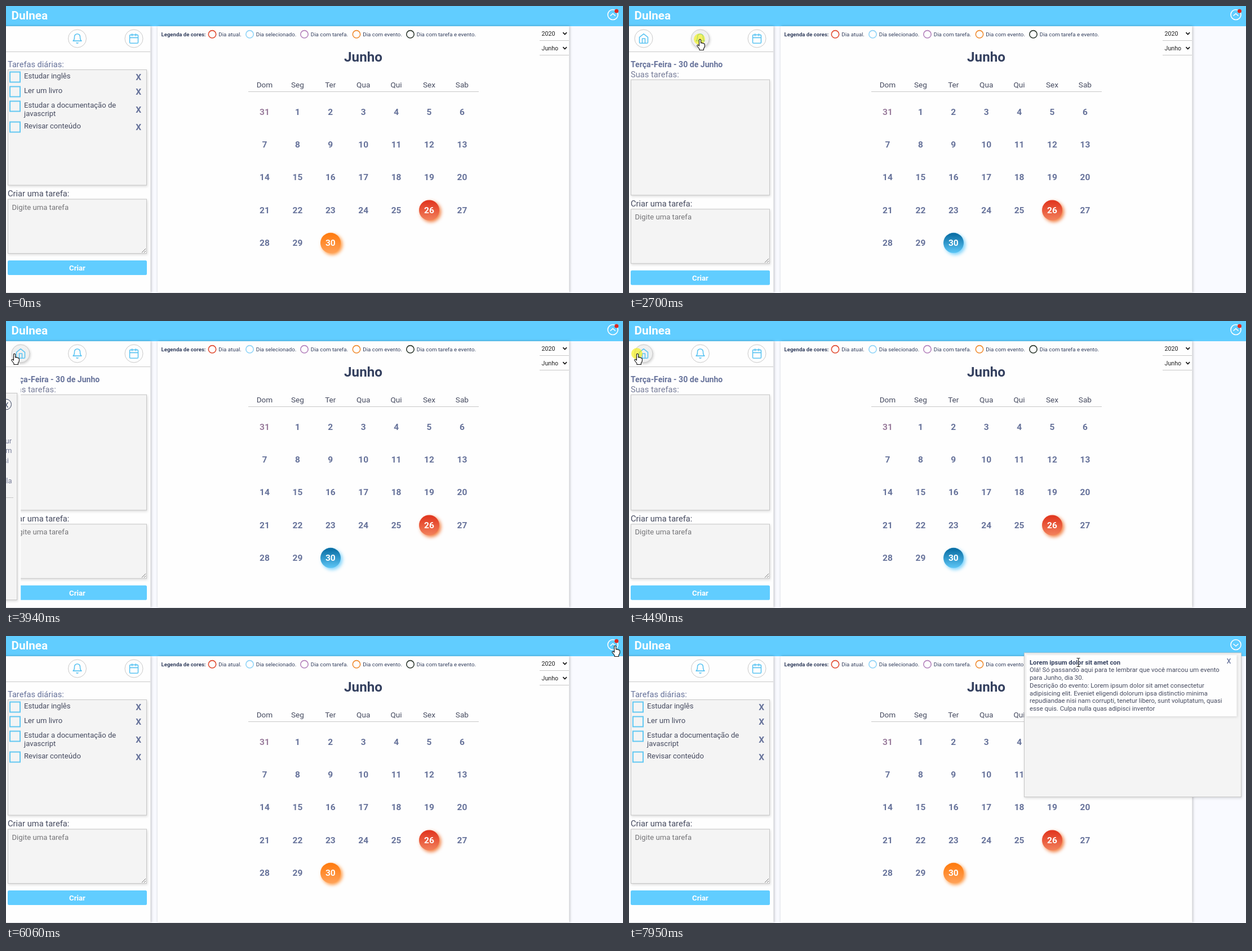
Animation, 1095 px wide and 511 px high, one loop 8 s. Source, as an HTML page:

```html
<!DOCTYPE html>
<html lang="pt">
<head>
<meta charset="utf-8">
<title>Calendário</title>
<style>
html, body { margin: 0; width: 100%; height: 100%; overflow: hidden; background: #f9faff; }
svg { display: block; font-family: Roboto, sans-serif; }
.icon { fill: none; stroke: #5bc4f2; stroke-width: 1.9; stroke-linejoin: round; stroke-linecap: round; }
.ring { fill: #fefefe; stroke: #c9c9c9; stroke-width: 1; }
.hover .ring { fill: #f0f0f0; filter: drop-shadow(1px 2px 2px #0003); }
.field { fill: #f4f4f4; stroke: #c6c6c6; filter: drop-shadow(1px 2px 2px #0002); }
.sheet { fill: #fefefe; filter: drop-shadow(1px 0 2px #0004); }
.card { fill: #fefefe; filter: drop-shadow(1px 1px 2px #0002); }
.rule { stroke: #c8c8c8; }
</style>
</head>
<body>
<svg id="stage" width="1095" height="511" viewBox="0 0 1095 511"></svg>
<script>
const DARK = '#34405f', MID = '#66729a', BODY = '#464b60', SOFT = '#767c98', SKY = '#61cdff';
const SPAN = 8000, TICK = 77.7;

const text = (x, y, s, size, fill, weight = 400, anchor = 'start') =>
  `<text x="${x}" y="${y}" font-size="${size}" fill="${fill}" font-weight="${weight}" text-anchor="${anchor}">${s}</text>`;
const box = (x, y, w, h, cls) => `<rect x="${x}" y="${y}" width="${w}" height="${h}" class="${cls}"/>`;
const rule = (x1, x2, y) => `<path class="rule" d="M${x1} ${y}H${x2}"/>`;
const lines = (x, y, step, list, size, fill) => list.map((s, i) => text(x, y + i * step, s, size, fill)).join('');
const gradient = (id, a, b) =>
  `<linearGradient id="${id}" x2="0" y2="1"><stop offset=".1" stop-color="${a}"/><stop offset="1" stop-color="${b}"/></linearGradient>`;
const ball = (id, x, y, fill, glow) =>
  `<circle id="${id}" cx="${x}" cy="${y}" r="18" fill="url(#${fill})" style="filter:drop-shadow(3px 3px 3px ${glow})"/>`;
// Icon paths are drawn on a 24-unit grid
const roundIcon = (id, x, d) =>
  `<g id="${id}" transform="translate(${x} 58)"><circle class="ring" r="16"/>
   <path class="icon" transform="scale(.83) translate(-12 -12)" d="${d}"/></g>`;

function header() {
  return `<rect width="1095" height="36" fill="${SKY}"/>` + text(9.5, 24, 'Dulnea', 20.8, '#fff', 700) +
    `<g fill="none" stroke="#fff" stroke-width="1.6"><circle cx="1077" cy="15.5" r="9"/>
     <path id="up" d="M1072.5 17.5l4.5-4 4.5 4"/><path id="down" d="M1072.5 14l4.5 4 4.5-4"/></g>
     <circle id="dot" cx="1083.5" cy="9" r="3.5" fill="#e0281f"/>`;
}

function calendar() {
  let out = box(269, 36, 730.5, 474, 'sheet') + text(275.5, 53.5, 'Legenda de cores:', 9.6, DARK, 700);
  [[366, '#e04a30', 'Dia atual.'], [432.5, '#8fd4f8', 'Dia selecionado.'], [529.5, '#b583bd', 'Dia com tarefa.'],
   [622, '#f08c30', 'Dia com evento.'], [717.5, '#2f3a30', 'Dia com tarefa e evento.']].forEach(([x, color, label]) => {
    out += `<circle cx="${x}" cy="50.3" r="6.7" fill="none" stroke="${color}" stroke-width="1.6"/>` + text(x + 11.3, 53.5, label, 9.75, DARK);
  });
  [['2020', 49], ['Junho', 75]].forEach(([s, y]) => {
    out += text(950.5, y + 3.8, s, 10.7, '#222') + rule(947, 999, y + 12.5) +
      `<path d="M988.5 ${y - 1.8}l3.3 3.3 3.3-3.3" fill="none" stroke="#111" stroke-width="1.7"/>`;
  });
  out += text(634, 98.5, 'Junho', 24.2, DARK, 700, 'middle') + rule(430, 839, 152.5);
  const colX = i => 459 + 58.4 * i;
  'Dom Seg Ter Qua Qui Sex Sab'.split(' ').forEach((s, i) => out += text(colX(i), 145.3, s, 13.6, BODY, 400, 'middle'));
  out += ball('today', 751, 363.5, 'red', '#f27a3c') + ball('event', 576, 421.8, 'orange', '#ff9236') +
    ball('picked', 576, 421.8, 'blue', '#5cc8fad0');
  for (let i = 0; i < 31; i++) {
    const fill = i === 0 ? '#9a7d9d' : i === 26 || i === 30 ? '#fff' : MID;
    out += text(colX(i % 7), 193.5 + 58.4 * Math.floor(i / 7), i || 31, 15.5, fill, 700, 'middle');
  }
  return out;
}

// Task list, text area and button, shared by both sidebar views
function taskForm(y) {
  return box(3.5, y + .5, 246, 205.5, 'field') + text(3, y + 226, 'Criar uma tarefa:', 14.7, BODY) +
    box(3.5, y + 231, 246, 96.5, 'field') + text(10.5, y + 249.5, 'Digite uma tarefa', 13.15, '#757578') +
    `<path d="M241 ${y + 326}l7-7m-3 7l3-3" stroke="#777"/>
     <rect x="3" y="${y + 340}" width="247" height="26" rx="2.5" fill="${SKY}"/>` +
    text(126.5, y + 357.8, 'Criar', 13.2, '#fff', 700, 'middle');
}

function sidebar() {
  let tasks = '';
  [[126.5, ['Estudar inglês']], [152.5, ['Ler um livro']],
   [178.5, ['Estudar a documentação de', 'javascript'], 184], [215.5, ['Revisar conteúdo']]].forEach(([y, rows, xy = y]) => {
    tasks += `<rect x="7" y="${y - 9}" width="18" height="18" fill="none" stroke="#62c8f2" stroke-width="2"/>` +
      lines(32, y + 2.7, 15.2, rows, 13.1, BODY) + text(235.3, xy + 5.5, 'X', 15.5, MID, 700, 'middle');
  });
  const lorem = ['Lorem ipsum dolor sit amet consectetur', 'adipisicing elit. Eveniet eligendi dolorum',
    'ipsa distinctio minima repudiandae nisi', 'nam corrupti, tenetur libero, sunt',
    'voluptatum, quasi esse quis. Culpa nulla', 'quas adipisci inventor'];
  return box(-5, 36, 261.5, 474, 'sheet') +
    `<g id="home">${text(3, 108.8, 'Tarefas diárias:', 14.6, MID) + taskForm(113) + tasks}</g>
     <g id="day">${text(3, 109, 'Terça-Feira - 30 de Junho', 14.1, MID, 700) + text(3, 126.5, 'Suas tarefas:', 14.7, SOFT) + taskForm(130.8)}</g>
     <g id="events"><rect y="82" width="256" height="427" fill="#fefefe"/>` +
    text(126.5, 104, 'Eventos', 16.8, DARK, 700, 'middle') + text(126.5, 124, 'Dia 30 de Junho', 16.8, DARK, 700, 'middle') +
    box(3.5, 128.5, 246, 368, 'field') + text(8, 152.5, 'Terça-Feira', 14.4, MID, 500) +
    `<circle cx="230" cy="148.5" r="9.3" fill="none" stroke="${DARK}"/>` + text(230, 153.5, 'X', 13.5, DARK, 400, 'middle') +
    text(8, 168, 'Nome:', 12, MID, 700) + text(8, 185, 'Lorem ipsum dolor sit amet con', 13.05, SOFT) +
    text(8, 200.5, 'Descrição:', 12, MID, 700) + lines(8, 217.5, 17.8, lorem, 13.05, SOFT) + rule(8, 243, 314.5) + '</g>' +
    rule(0, 256, 81.5) +
    roundIcon('house', 26, 'M3 9l9-7 9 7v11a2 2 0 0 1-2 2H5a2 2 0 0 1-2-2zM9 22V12h6v10') +
    roundIcon('back', 26, 'M19 12H5M12 19l-7-7 7-7') +
    roundIcon('bell', 126.5, 'M18 8A6 6 0 0 0 6 8c0 7-3 9-3 9h18s-3-2-3-9M13.7 21a2 2 0 0 1-3.4 0') +
    roundIcon('agenda', 227, 'M5 4H19a2 2 0 0 1 2 2V20a2 2 0 0 1-2 2H5a2 2 0 0 1-2-2V6a2 2 0 0 1 2-2zM16 2v4M8 2v4M3 10h18');
}

function notice() {
  const rows = ['Olá! Só passando aqui para te lembrar que você marcou um evento', 'para Junho, dia 30.',
    'Descrição do evento: Lorem ipsum dolor sit amet consectetur', 'adipisicing elit. Eveniet eligendi dolorum ipsa distinctio minima',
    'repudiandae nisi nam corrupti, tenetur libero, sunt voluptatum, quasi', 'esse quis. Culpa nulla quas adipisci inventor'];
  return `<g id="notice">${box(701.5, 30, 385, 256.5, 'field') + box(705, 34, 373.5, 109, 'card')}` +
    text(711, 50.7, 'Lorem ipsum dolor sit amet con', 11.3, DARK, 700) +
    lines(711, 64.3, 13.75, rows, 11.35, BODY) + text(1064.5, 49, 'X', 12, MID, 500, 'middle') + '</g>';
}

function overlay() {
  return `<g id="tip"><rect x="592.5" y="443.5" width="155" height="19" fill="#2b2b2b" stroke="#6a6a6a"/>
    <text x="598" y="456.5" font-size="9.2" fill="#fff" font-family="Open Sans, Noto Sans, sans-serif">há tarefas e eventos para este dia</text></g>
    <circle id="click" r="10" fill="#f5f000" opacity=".6"/>
    <g id="cursor" fill="#fff" stroke="#111" stroke-width="1.1" stroke-linejoin="round">
    <path id="arrow" d="M.5.5V16L4 12.6 6.4 18 8.8 17 6.5 11.6H11.5Z"/>
    <path id="hand" d="M-1.5 1.2Q0-.8 1.5 1.2V7Q3 5.6 4.3 7.4 5.8 6.4 6.7 8.2 8.3 7.6 8.4 9.5V13.5L6.4 17V19.5H-1V17.5L-5.2 12Q-5.2 9.4-3 10.6L-1.5 12Z"/>
    <path id="ibeam" fill="none" stroke="#222" d="M-3-7.5H-1Q0-7.5 0-6.5 0-7.5 1-7.5H3M0-6.5V6.5M-3 7.5H-1Q0 7.5 0 6.5 0 7.5 1 7.5H3"/></g>`;
}

document.getElementById('stage').innerHTML =
  gradient('red', '#e23a22', '#f2815c') + gradient('orange', '#ff7d12', '#ffa158') + gradient('blue', '#0d72a8', '#5cc6f6') +
  header() + calendar() + sidebar() + notice() + overlay();

const el = {};
document.querySelectorAll('#stage [id]').forEach(e => el[e.id] = e);
const show = (id, on) => el[id].style.display = on ? '' : 'none';
const move = (id, x, y) => el[id].setAttribute('transform', `translate(${x.toFixed(2)} ${y.toFixed(2)})`);
const part = (t, from, length) => Math.min(1, Math.max(0, (t - from) / length));
const glide = p => 1 - (1 - p) ** 2.2;
const smooth = p => p * p * (3 - 2 * p);

const path = [[140, 1032, 357], [910, 584, 431], [1990, 584, 431], [2460, 126, 59], [2980, 126, 59], [3170, 113.7, 59],
  [3470, 15, 58], [4640, 15, 58], [5180, 951, 20], [5300, 951, 20], [5650, 1081, 17], [6280, 1081, 17], [6760, 848, 3],
  [6800, 848, 3], [7160, 744, 60], [7260, 744, 60], [7460, 715.5, 50], [7570, 715.5, 50], [7900, 797.5, 47]];
const clicks = [1765, 2695, 3550, 4405, 6110];

function pointer(t) {
  const i = path.findIndex(k => k[0] > t);
  if (i < 0) return path[path.length - 1].slice(1);
  if (i === 0) return path[0].slice(1);
  const [t0, x0, y0] = path[i - 1], [t1, x1, y1] = path[i];
  const p = smooth((t - t0) / (t1 - t0));
  return [x0 + (x1 - x0) * p, y0 + (y1 - y0) * p];
}

function draw(time) {
  const t = time < 140 ? 0 : 140 + Math.floor((time - 140) / TICK + .15) * TICK;
  const [x, y] = pointer(t);
  const near = (cx, cy, r) => Math.hypot(x - cx, y - cy) < r;

  const day = t > 1840 && t < 4560, events = t > 2770 && t < 3630;
  show('home', !day);
  show('day', day);
  show('house', day && !events);
  show('back', events);
  move('events', -258 * (1 - glide(part(t, 2780, 500)) + glide(part(t, 3630, 500))), 0);

  const picked = smooth(part(t, 860, 340)) - smooth(part(t, 4560, 300));
  el.picked.style.opacity = picked;
  el.event.style.opacity = 1 - picked ** 3;
  el.tip.style.opacity = part(t, 1300, 140);
  show('tip', t > 1380 && t < 1840);

  const open = t > 6180;
  show('up', !open);
  show('down', open);
  show('dot', !open);
  show('notice', open);
  move('notice', 0, -290 * (1 - glide(part(t, 6180, 450))));

  const onHome = day && near(26, 58, 17), onBell = near(126.5, 58, 17);
  el.house.classList.toggle('hover', onHome);
  el.back.classList.toggle('hover', onHome);
  el.bell.classList.toggle('hover', onBell);
  const beam = open && x > 705 && x < 1079 && y > 34;
  const hand = onHome || onBell || near(576, 422, 18) || near(1077, 15.5, 13);
  show('cursor', t >= 140);
  show('ibeam', beam);
  show('hand', hand && !beam);
  show('arrow', !hand && !beam);
  move('cursor', x, y);
  show('click', clicks.some(c => t >= c && t < c + 170));
  move('click', x - 1, y);
}

const start = performance.now();
function loop() {
  draw((performance.now() - start) % SPAN);
  requestAnimationFrame(loop);
}
loop();
</script>
</body>
</html>
```
